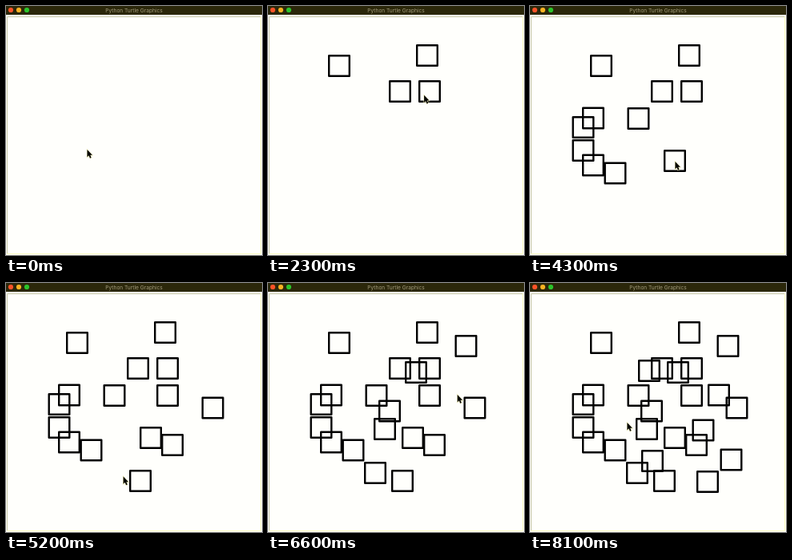
Write an HTML page that moves like this. It is 320x312 px and loops after 8.2 s.

```html
<!DOCTYPE html>
<html lang="en">
<head>
<meta charset="utf-8">
<title>Python Turtle Graphics</title>
<style>
  html, body { margin: 0; width: 100%; height: 100%; overflow: hidden; background: #fffffc; }
  svg { display: block; width: 100%; height: 100%; }
  text { font: 6.6px Inter, "Open Sans", sans-serif; fill: #a39c7c; text-anchor: middle; }
  #squares rect { fill: none; stroke: #000; stroke-width: 2.4; stroke-linejoin: round; }
</style>
</head>
<body>
<svg viewBox="0 0 320 312">
  <rect width="320" height="312" fill="#fffffc"/>
  <rect width="320" height="11" fill="#2b270a"/>
  <circle cx="6" cy="5" r="3.1" fill="#ff5328"/>
  <circle cx="16" cy="5" r="3.1" fill="#ffb322"/>
  <circle cx="26" cy="5" r="3.1" fill="#2bc52b"/>
  <text x="160" y="7.8">Python Turtle Graphics</text>
  <path d="M1.5 310V13.5H318" fill="none" stroke="#c8c8a8"/>
  <path d="M1 310.5H318.5V13" fill="none" stroke="#fafac0"/>
  <g id="squares"></g>
  <path id="pointer" d="M.5 1V10.3L2.6 8.3L4 11.7L5.6 11L4.2 7.8H6.9Z"
        stroke="#f0eebc" stroke-width="1.2" paint-order="stroke"/>
</svg>
<script>
const LOOP = 8200, STEP = 100, SIDE = 25.6;

// The hand clicks in bursts, each at a steady pace.
const bursts = [
  { from: 900, every: 450, points: [[89, 75], [165, 107], [199, 62], [202, 107], [135.5, 141]] },
  { from: 3400, every: 180, points: [[79, 140.5], [66.5, 152], [66.5, 181], [79, 199.5], [106.5, 209.5],
    [181, 194], [202, 141], [258.5, 156.5], [208, 203], [168, 248]] },
  { from: 5300, every: 225, points: [[134, 238], [146, 183], [152, 160.5], [185, 112], [247.5, 79]] },
  { from: 6610, every: 245, points: [[236, 140.5], [216.5, 184.5], [251.5, 221.5], [222, 249], [153, 223], [149, 110]] }
];
const clicks = bursts.flatMap(({ from, every, points }) =>
  points.map(([x, y], i) => ({ time: from + i * every, x, y })));
const path = [{ time: 0, x: 101, y: 179 }, ...clicks, { time: LOOP - STEP, x: 121, y: 174 }];

const group = document.getElementById("squares");
const pointer = document.getElementById("pointer");
const squares = clicks.map(({ x, y }) => {
  const rect = document.createElementNS(group.namespaceURI, "rect");
  const attrs = { x: x - SIDE / 2, y: y - SIDE / 2, width: SIDE, height: SIDE };
  for (const name in attrs) rect.setAttribute(name, attrs[name]);
  group.append(rect);
  return rect;
});

function pointerAt(time) {
  const next = Math.max(1, path.findIndex(point => point.time >= time));
  const a = path[next - 1], b = path[next];
  const k = (time - a.time) / (b.time - a.time);
  return [a.x + (b.x - a.x) * k, a.y + (b.y - a.y) * k];
}

function draw(now) {
  const time = Math.floor((now % LOOP) / STEP) * STEP;
  squares.forEach((rect, i) =>
    rect.setAttribute("visibility", time >= clicks[i].time ? "visible" : "hidden"));
  pointer.setAttribute("transform", `translate(${pointerAt(time)})`);
}

let start;
function tick(now) {
  start ??= now;
  draw(now - start);
  requestAnimationFrame(tick);
}
draw(0);
requestAnimationFrame(tick);
</script>
</body>
</html>
```
